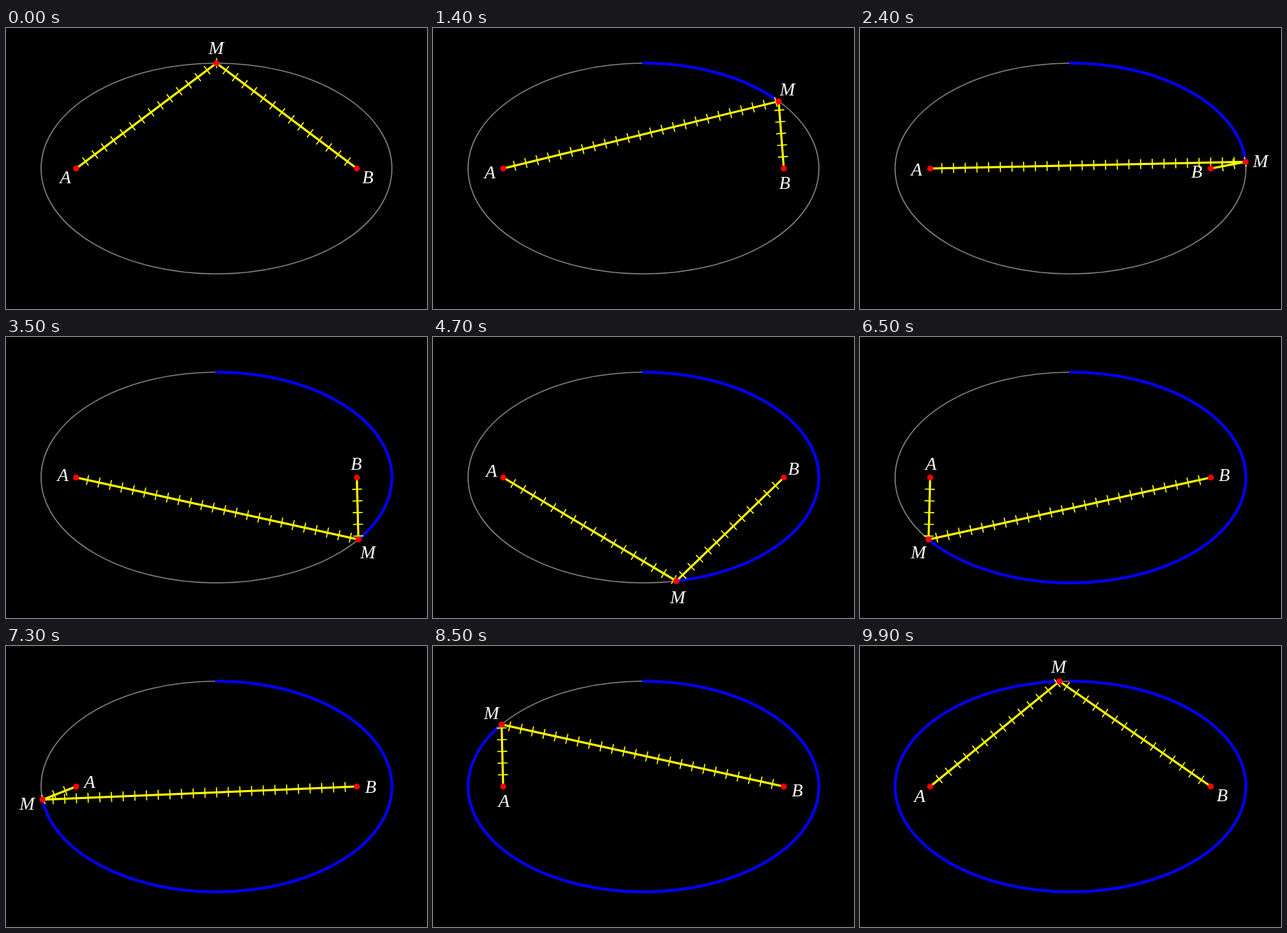
Animation of 600x400 px, one loop 10000 ms. Source, as an HTML page with a canvas:

```html
<!DOCTYPE html>
<html lang="en">
<head>
<meta charset="utf-8">
<title>String construction of an ellipse</title>
<style>
html, body { margin: 0; width: 100%; height: 100%; overflow: hidden; background: #000; }
canvas { display: block; }
</style>
</head>
<body>
<canvas id="stage" width="600" height="400"></canvas>
<script>
const ctx = document.getElementById('stage').getContext('2d');
const STEPS = 100, STEP_MS = 100;
const CX = 300, CY = 200, RX = 250, RY = 150;
const A = [100, 200], B = [500, 200];
const STRING = 2 * RX, PARTS = 30, TICK = 13;

const unit = (x, y) => {
  const len = Math.max(Math.hypot(x, y), 1e-6);
  return [x / len, y / len];
};
const toward = (p, q) => unit(q[0] - p[0], q[1] - p[1]);

function stroke(color, width, trace) {
  ctx.strokeStyle = color;
  ctx.lineWidth = width;
  ctx.beginPath();
  trace();
  ctx.stroke();
}

function arc(from, sweep) {
  ctx.ellipse(CX, CY, RX, RY, 0, from, from + sweep);
}

function dot([x, y]) {
  ctx.fillStyle = '#f00';
  ctx.beginPath();
  ctx.arc(x, y, 4.3, 0, 2 * Math.PI);
  ctx.fill();
}

// Centres the letter's ink at a distance from the point.
function label(text, [x, y], [dx, dy], dist) {
  const m = ctx.measureText(text);
  const shift = (m.actualBoundingBoxLeft - m.actualBoundingBoxRight) / 2;
  ctx.fillStyle = '#fff';
  ctx.fillText(text, x + dx * dist + shift - 0.3, y + dy * dist + 9.4);
}

// Ticks are evenly spaced along the whole string A-M-B.
function ticks(M, u, v) {
  const bend = Math.hypot(M[0] - A[0], M[1] - A[1]);
  for (let k = 1; k < PARTS; k++) {
    const s = k * STRING / PARTS - bend;
    const atBend = Math.abs(s) < 1e-6;
    const side = s < 0 ? u : v;
    const [dx, dy] = atBend ? unit(u[0] + v[0], u[1] + v[1]) : side;
    const x = M[0] + side[0] * s, y = M[1] + side[1] * s;
    const nx = -dy * TICK / 2, ny = dx * TICK / 2;
    ctx.moveTo(x - nx, y - ny);
    ctx.lineTo(x + nx, y + ny);
  }
}

function draw(step) {
  const angle = step / STEPS * 2 * Math.PI;
  const sin = Math.sin(angle), cos = Math.cos(angle);
  const M = [CX + RX * sin, CY - RY * cos];
  const u = toward(A, M), v = toward(M, B);

  ctx.fillStyle = '#000';
  ctx.fillRect(0, 0, 600, 400);
  ctx.lineCap = ctx.lineJoin = 'round';
  stroke('#808080', 1.6, () => arc(0, 2 * Math.PI));
  if (step) stroke('#00f', 4, () => arc(-Math.PI / 2, angle));
  stroke('#ff0', 3, () => {
    ctx.moveTo(...A);
    ctx.lineTo(...M);
    ctx.lineTo(...B);
  });
  stroke('#ff0', 1.6, () => ticks(M, u, v));
  [A, B, M].forEach(dot);

  ctx.font = 'italic 26px "Liberation Serif", serif';
  ctx.textAlign = 'center';
  label('A', A, [-u[0], -u[1]], 20);
  label('B', B, v, 20);
  label('M', M, unit(sin / RX, -cos / RY), 22);
}

function loop() {
  draw(Math.floor(performance.now() / STEP_MS) % STEPS);
  requestAnimationFrame(loop);
}
loop();
</script>
</body>
</html>
```
